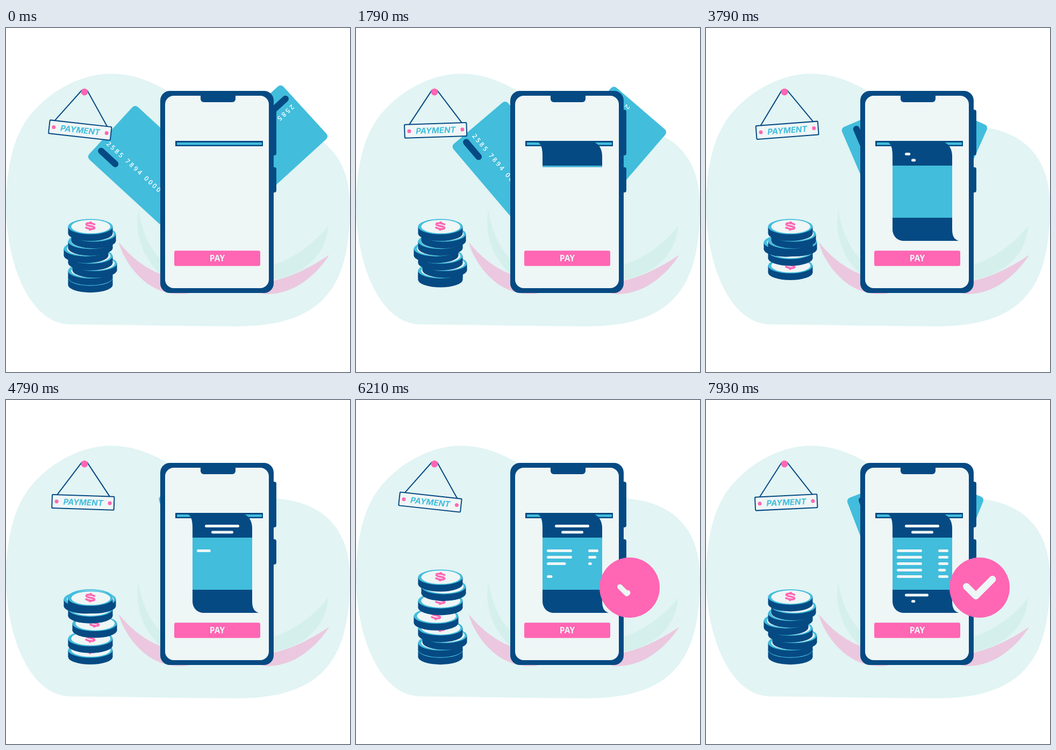
An HTML page with a canvas for the animation above (8 s loop, 640x640 px).

```html
<!DOCTYPE html>
<html lang="en">
<head>
<meta charset="utf-8">
<title>Payment</title>
<style>
html, body { margin: 0; width: 100%; height: 100%; overflow: hidden; background: #fff; }
canvas { display: block; width: 100vmin; height: 100vmin; }
</style>
</head>
<body>
<canvas id="stage" width="640" height="640"></canvas>
<script>
const ctx = document.getElementById('stage').getContext('2d');
const LOOP = 8;
const NAVY = '#064a83', CYAN = '#42bddc', PINK = '#ff66b3', PAPER = '#eef6f6';
const TAU = Math.PI * 2, RAD = Math.PI / 180;

const BLOB = new Path2D('M0,330 C0,270 12,215 30,185 C60,130 130,85 195,85 C240,85 275,102 310,122 C380,165 430,180 498,183 C590,188 640,240 640,330 C640,470 600,555 430,555 C330,555 220,552 120,551.5 C40,550 0,430 0,330Z');
const GREEN_LEAVES = new Path2D('M246,339 C238,385 255,440 310,475 V450 C275,425 255,390 246,339Z M599,368 C598,420 550,465 490,469 V443 C535,430 575,400 599,368Z');
const PINK_LEAVES = new Path2D('M210,400 C222,440 262,496 325,495 Q340,495 350,490 V470 C300,470 250,448 212,401Z M601,423 C580,455 540,495 487,495 Q475,495 465,490 V474 C510,474 560,450 600,423Z');
const RECEIPT = new Path2D('M336,211 H437 C450,212 458,224 458,238 V374 C458,388 462,393 470,396 H368 C355,396 347,386 347,374 V238 C347,225 345,214 336,211Z');
const DOLLAR_S = new Path2D('M8.6,-3.4 Q4,-5.3 0,-5.3 C-6,-5.3 -8,-3.9 -8,-2.7 C-8,.8 8,-.8 8,2.7 C8,4 5,5.3 0,5.3 Q-5,5.3 -9,3.2');
const DOLLAR_BAR = new Path2D('M0,-8.5 V-5 M0,5 V8.5');

// Printed lines: [left, right, y, step at which the line starts]
const PRINT = [
  [370, 434, 234.5, 0], [382, 423, 246, 0],
  [355, 402, 280.5, 1], [355, 402, 292.5, 2], [355, 402, 304.5, 3],
  [355, 402, 328.5, 4], [355, 402, 316.5, 5],
  [432, 451, 280.5, 2], [432, 451, 292.5, 3], [432, 451, 304.5, 4],
  [432, 451, 328.5, 5], [432, 451, 316.5, 6],
  [370, 434, 363, 6], [382, 423, 374.5, 7]
];
const COIN_X = [157, 157, 165, 157, 149, 157, 163, 157]; // bottom to top

const ramp = (t, from, to) => Math.min(1, Math.max(0, (t - from) / (to - from)));
const smooth = u => (1 - Math.cos(Math.PI * u)) / 2;

function fill(path, color) {
  ctx.fillStyle = color;
  ctx.fill(path);
}

function box(x, y, w, h, r, color) {
  ctx.beginPath();
  ctx.roundRect(x, y, w, h, r);
  ctx.fillStyle = color;
  ctx.fill();
}

function oval(x, y, rx, ry, color) {
  ctx.beginPath();
  ctx.ellipse(x, y, rx, ry, 0, 0, TAU);
  ctx.fillStyle = color;
  ctx.fill();
}

function stroke(points, width, color) {
  ctx.beginPath();
  points.forEach(([x, y]) => ctx.lineTo(x, y));
  ctx.lineWidth = width;
  ctx.strokeStyle = color;
  ctx.lineCap = ctx.lineJoin = 'round';
  ctx.stroke();
}

function label(text, x, y, font, color, align = 'center', spacing = 0) {
  ctx.font = font;
  ctx.textAlign = align;
  ctx.textBaseline = 'alphabetic';
  ctx.letterSpacing = spacing + 'px';
  ctx.fillStyle = color;
  ctx.fillText(text, x, y);
  ctx.letterSpacing = '0px';
}

function saved(draw) {
  ctx.save();
  draw();
  ctx.restore();
}

// A card with its top left corner at (x, y), swung around (px, py).
function card(x, y, angle, px, py, swing) {
  saved(() => {
    ctx.translate(px, py);
    ctx.rotate(swing * RAD);
    ctx.translate(x - px, y - py);
    ctx.rotate(angle * RAD);
    box(0, 0, 215, 133, 7, CYAN);
    stroke([[12.5, 106.5], [48, 106.5]], 12, NAVY);
    label('2585 7894 0000', 10.6, 91.3, '600 12px "Open Sans", "Noto Sans", sans-serif', '#fff', 'left', 3.4);
  });
}

function cards(t) {
  const u = smooth(t / 6);
  card(240, 142, 42.6, 324, 448, 34.5 * u);
  card(601, 202, 137.6, 516.5, 374, -33.5 * u);
}

function sign(t) {
  saved(() => {
    ctx.translate(146, 119);
    ctx.rotate(6.4 * RAD * Math.cos(TAU * t / 6));
    for (const side of [-1, 1]) stroke([[side * 5, -3], [side * 49, 59]], 2, NAVY);
    box(-59, 58, 117.5, 27, 2.5, NAVY);
    box(-57, 60, 113.5, 23, 1, PAPER);
    for (const x of [-49.5, 49.5]) oval(x, 71.5, 3.5, 3.5, PINK);
    label('PAYMENT', 0, 76.8, 'italic 700 15px Inter, "Open Sans", sans-serif', CYAN);
  });
  oval(146, 119, 6.5, 6.5, PINK);
}

function coin(x, y) {
  oval(x, y + 12.5, 41.5, 14.3, NAVY);
  ctx.fillRect(x - 41.5, y, 83, 12.5);
  oval(x, y, 41.5, 14.3, CYAN);
  oval(x + 0.8, y, 36.5, 12.6, PAPER);
  saved(() => {
    ctx.translate(x, y - 1);
    ctx.rotate(6 * RAD);
    ctx.strokeStyle = PINK;
    ctx.lineCap = 'butt';
    ctx.lineWidth = 3.4;
    ctx.stroke(DOLLAR_S);
    ctx.lineWidth = 4;
    ctx.stroke(DOLLAR_BAR);
  });
}

// A wave lifts the coins one after another, starting at the bottom.
function coins(t) {
  COIN_X.forEach((x, i) => {
    const local = t - i * 0.485;
    const lift = local < 2.9 ? smooth(ramp(local, 1.25, 2.9)) : 1 - smooth(ramp(local, 2.9, 4.88));
    coin(x, 465.4 - 13.7 * i - 40 * lift);
  });
}

function phone() {
  box(490, 152, 13, 85, 4, NAVY);
  box(490, 259, 13, 47, 4, NAVY);
  box(287, 117, 211, 376, 18, NAVY);
  box(296, 126, 193, 358, 16, PAPER);
  box(362, 120, 65, 18, [0, 0, 6, 6], NAVY);
  box(315, 210, 163, 10, 0, NAVY);
  box(318, 213, 158, 4.5, 0, CYAN);
}

function button(t) {
  saved(() => {
    const press = 1 - 0.05 * Math.sin(Math.PI * ramp(t, 0.2, 0.85));
    ctx.translate(393, 428.5);
    ctx.scale(press, press);
    box(-80, -14.3, 160, 28.5, 3, PINK);
    label('PAY', 0, 5.2, '700 15.5px "Open Sans", "Noto Sans", sans-serif', PAPER);
  });
}

function receipt(t) {
  const shown = ramp(t, 1.37, 2.99);
  if (!shown) return;
  saved(() => {
    ctx.beginPath();
    ctx.rect(330, 210.5, 145, 185.5 * shown);
    ctx.clip();
    fill(RECEIPT, NAVY);
    box(347, 256, 111, 97, 0, CYAN);
  });
  for (const [left, right, y, step] of PRINT) {
    const start = 3.7 + 0.595 * step;
    const u = ramp(t, start, start + 1);
    if (u) stroke([[left + 2.5, y], [left + 2.5 + (right - left - 5) * u, y]], 5, PAPER);
  }
}

function badge(t) {
  const size = ramp(t, 4.8, 5.47);
  if (!size) return;
  oval(509, 349, 56 * size, 56 * size, PINK);
  const drawn = 69 * ramp(t, 5.66, 7);
  if (!drawn) return;
  saved(() => {
    const scale = ramp(t, 5.47, 6.47);
    ctx.translate(509, 349);
    ctx.scale(scale, scale);
    ctx.setLineDash([drawn, 100]);
    stroke([[-24.5, -2], [-7, 15.5], [24, -15.5]], 13, PAPER);
  });
}

function frame(now) {
  const t = now / 1000 % LOOP;
  ctx.fillStyle = '#fff';
  ctx.fillRect(0, 0, 640, 640);
  fill(BLOB, '#e2f4f4');
  fill(GREEN_LEAVES, '#d5f0ec');
  fill(PINK_LEAVES, '#ebc8df');
  cards(t);
  phone();
  button(t);
  receipt(t);
  badge(t);
  sign(t);
  coins(t);
}

let origin;
function tick(now) {
  origin ??= now;
  frame(now - origin);
  requestAnimationFrame(tick);
}
frame(0);
requestAnimationFrame(tick);
</script>
</body>
</html>
```
